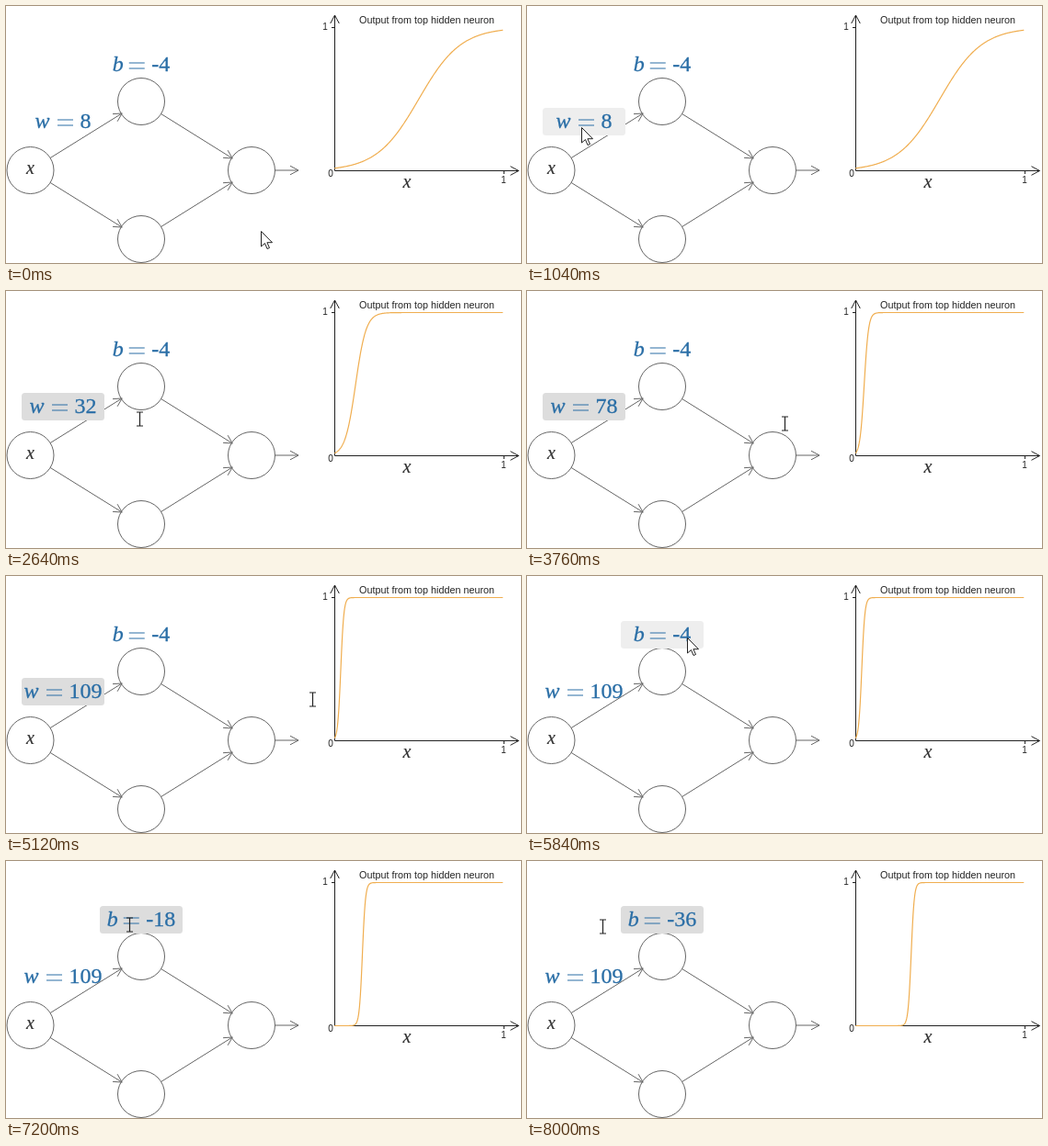
Animation of 560 by 280 pixels, one loop 8.08 s. Source, as an HTML page:

```html
<!DOCTYPE html>
<html lang="en">
<head>
<meta charset="utf-8">
<title>Hidden neuron output</title>
<style>
  html, body { margin: 0; width: 100%; height: 100%; overflow: hidden; background: #fff; }
  svg { display: block; }
  .net { fill: none; stroke: #666; }
  .axis { fill: none; stroke: #222; }
  .label { font-family: "Liberation Sans", Arial, sans-serif; font-size: 10.8px; fill: #222; }
  .tick { font-size: 10px; text-anchor: middle; }
  .math { font-family: "Liberation Serif", "Times New Roman", serif; font-size: 24px; }
  .var { font-style: italic; }
  .x { font-size: 20px; fill: #333; text-anchor: middle; stroke: #333; stroke-width: .2; }
  .param { fill: #2a6ea6; stroke: #2a6ea6; stroke-width: .3; }
  .param path { stroke-width: 1.2; }
  #curve { fill: none; stroke: #f0ae50; stroke-width: 1.2; stroke-linejoin: round; }
</style>
</head>
<body>
<svg width="560" height="280">
  <g id="net" class="net"></g>
  <g id="axes" class="axis"><path d="M354 23.5H357M541.5 180V183"/></g>
  <text class="math var x" x="26.5" y="183">x</text>
  <text class="math var x" x="436" y="198">x</text>
  <text class="label" x="384" y="19">Output from top hidden neuron</text>
  <text class="label tick" x="353" y="186">0</text>
  <text class="label tick" x="347" y="26">1</text>
  <text class="label tick" x="541" y="193">1</text>
  <path id="curve"/>
  <g id="params"></g>
  <path id="arrow" d="M0 0V16.5L4 13L6.5 19L9 18L6.4 12.2H12Z" fill="#fff" stroke="#222" stroke-linejoin="round"/>
  <path id="beam" d="M-3.5 -7.5H3.5M-3.5 7.5H3.5M0 -7.5V7.5" fill="none" stroke="#222" stroke-width="1.2"/>
</svg>
<script>
const LOOP = 8080, STEP = 80, RADIUS = 25.5;
const $ = id => document.getElementById(id);

function add(parent, tag, attrs = {}) {
  const el = document.createElementNS("http://www.w3.org/2000/svg", tag);
  for (const k in attrs) el.setAttribute(k, attrs[k]);
  return parent.appendChild(el);
}

// Line with an open head, shortened by gap at both ends
function addArrow(parent, [x1, y1], [x2, y2], gap = 0) {
  const len = Math.hypot(x2 - x1, y2 - y1);
  const ux = (x2 - x1) / len, uy = (y2 - y1) / len;
  const at = (along, side) => `${x1 + ux * along - uy * side} ${y1 + uy * along + ux * side}`;
  const end = len - gap + 1;
  add(parent, "path", {
    d: `M${at(gap, 0)}L${at(end, 0)}M${at(end - 9, 4.8)}L${at(end, 0)}L${at(end - 9, -4.8)}`
  });
}

const input = [26.5, 179], output = [267, 179], hidden = [[147, 104], [147, 254]];
for (const [cx, cy] of [input, output, ...hidden])
  add($("net"), "circle", { cx, cy, r: RADIUS });
for (const node of hidden) {
  addArrow($("net"), input, node, RADIUS);
  addArrow($("net"), node, output, RADIUS);
}
addArrow($("net"), [292.5, 179], [317, 179]);
addArrow($("axes"), [357.5, 179.5], [357.5, 11]);
addArrow($("axes"), [357.5, 179.5], [556.5, 179.5]);

// Draggable "name = value" box
class Param {
  constructor(name, nameWidth, x, y) {
    Object.assign(this, { nameWidth, x, y });
    const g = add($("params"), "g", { class: "math param" });
    this.box = add(g, "rect", { x, y, width: 90, height: 30, rx: 3.5, stroke: "none" });
    this.name = add(g, "text", { class: "var", y: y + 22 });
    this.name.textContent = name;
    this.equals = add(g, "path");
    this.value = add(g, "text", { y: y + 22 });
  }
  contains(px, py) {
    return px >= this.x && px <= this.x + 90 && py >= this.y && py <= this.y + 30;
  }
  draw(value, fill) {
    this.value.textContent = value;
    const width = this.nameWidth + 32 + this.value.getComputedTextLength();
    const left = this.x + 45 - width / 2;
    const eq = left + this.nameWidth + 7.5, mid = this.y + 16;
    this.box.setAttribute("fill", fill);
    this.name.setAttribute("x", left);
    this.equals.setAttribute("d", `M${eq} ${mid - 3}h17M${eq} ${mid + 3}h17`);
    this.value.setAttribute("x", left + this.nameWidth + 32);
  }
}
const weight = new Param("w", 17, 17, 111);
const bias = new Param("b", 10.5, 102, 49);

// Pointer stops: time, x, y
const STOPS = [
  [0, 277, 245], [160, 277, 245], [1040, 59, 132], [1440, 62, 132],
  [2640, 145, 139], [3760, 280, 144], [5120, 333, 134],
  [5840, 174, 67], [6240, 174, 67], [6640, 171, 68], [LOOP - STEP, 82, 71]
];

function pointer(t) {
  const i = Math.max(1, STOPS.findIndex(s => s[0] >= t));
  const [t0, x0, y0] = STOPS[i - 1], [t1, x1, y1] = STOPS[i];
  const p = (t - t0) / (t1 - t0);
  return [x0 + (x1 - x0) * p, y0 + (y1 - y0) * p];
}

function easeSine(t, from, to) {
  const p = Math.min(1, Math.max(0, (t - from) / (to - from)));
  return (1 - Math.cos(Math.PI * p)) / 2;
}

function sigmoidPath(w, b) {
  const pts = [];
  for (let x = 0; x <= 183; x += .5) {
    const s = 1 / (1 + Math.exp(-(w * x / 183 + b)));
    pts.push(`${357.3 + x} ${179.5 - 156 * s}`);
  }
  return "M" + pts.join("L");
}

function render(t) {
  const [x, y] = pointer(t);
  const held = t >= 1440 && t < 5200 ? weight : t >= 6240 ? bias : null;
  const w = Math.round(8 + 101 * easeSine(t, 1440, 5160));
  const b = Math.round(-4 - (held === bias ? (174 - x) * 32 / 92 : 0));
  const shade = p => held === p ? "#ddd" : !held && p.contains(x, y) ? "#eee" : "none";
  weight.draw(w, shade(weight));
  bias.draw(b, shade(bias));
  $("curve").setAttribute("d", sigmoidPath(w, b));
  for (const [id, on] of [["arrow", !held], ["beam", held]]) {
    $(id).setAttribute("transform", `translate(${Math.round(x) + .5} ${Math.round(y) + .5})`);
    $(id).setAttribute("visibility", on ? "visible" : "hidden");
  }
}

const start = performance.now();
function tick() {
  const t = (performance.now() - start) % LOOP;
  render(Math.floor(t / STEP) * STEP);
  requestAnimationFrame(tick);
}
tick();
</script>
</body>
</html>
```
